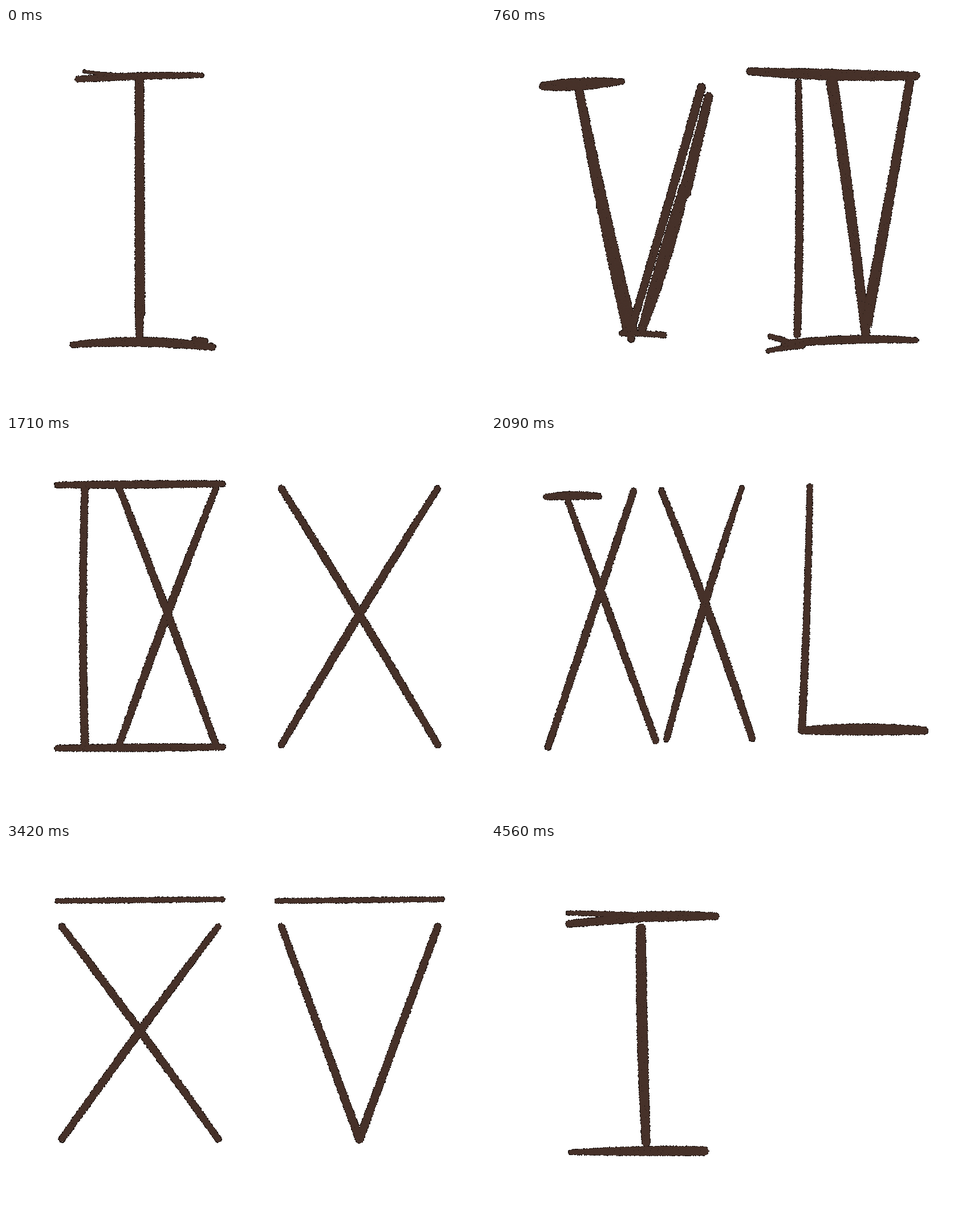
Animation of 840 by 667 pixels, one loop 4750 ms. Source, as an HTML page with a canvas:

```html
<!DOCTYPE html>
<html lang="en">
<head>
<meta charset="utf-8">
<title>Roman numerals</title>
<style>
html, body { margin: 0; width: 100%; height: 100%; overflow: hidden; background: #fff; }
canvas { display: block; }
</style>
</head>
<body>
<canvas id="stage" width="840" height="667"></canvas>
<script>
const STEP = 190, STEPS = 25;
const INK = '#47322a', EDGE = '#1d1411';
const ctx = document.getElementById('stage').getContext('2d');

let seed = 1;
const rand = () => (seed = (seed * 16807) % 2147483647) / 2147483647;
const jitter = a => (rand() * 2 - 1) * a;
const mix = (a, b, t) => a + (b - a) * t;

// A stroke is a list of samples {x, y, w, nx, ny}; the normal points to the side of a positive bow.
function sample(count, at) {
  return Array.from({ length: count + 1 }, (_, i) => {
    const t = i / count, p = at(t), a = at(Math.max(0, t - 0.01)), b = at(Math.min(1, t + 0.01));
    const d = Math.hypot(b.x - a.x, b.y - a.y) || 1;
    return { ...p, nx: (b.y - a.y) / d, ny: (a.x - b.x) / d };
  });
}

// One pull of the brush: tapered from w0 to w1, bowed sideways, fuller in the middle by belly.
function line(x0, y0, x1, y1, w0 = 12, w1 = w0, bow = 0, belly = 0) {
  const length = Math.hypot(x1 - x0, y1 - y0);
  const nx = (y1 - y0) / length, ny = (x0 - x1) / length;
  return sample(Math.ceil(length / 1.5), t => {
    const arch = 4 * t * (1 - t);
    return {
      x: mix(x0, x1, t) + nx * bow * arch,
      y: mix(y0, y1, t) + ny * bow * arch,
      w: mix(w0, w1, t) + belly * arch
    };
  });
}

// A smooth round stroke through a few points.
function curve(w, ...coords) {
  const pts = [];
  for (let i = 0; i < coords.length; i += 2) pts.push([coords[i], coords[i + 1]]);
  const last = pts.length - 1;
  const dist = (p, q) => Math.hypot(q[0] - p[0], q[1] - p[1]) || 1;
  const slope = (i, axis) => {
    const p = pts[Math.max(0, i - 1)], q = pts[Math.min(last, i + 1)];
    return (q[axis] - p[axis]) / dist(p, q);
  };
  const length = pts.slice(1).reduce((sum, p, i) => sum + dist(pts[i], p), 0);
  return sample(Math.ceil(length / 1.5), t => {
    const i = Math.min(last - 1, Math.floor(t * last)), f = t * last - i;
    const size = dist(pts[i], pts[i + 1]), ease = f * f * (3 - 2 * f);
    const coord = axis => mix(pts[i][axis], pts[i + 1][axis], ease) +
      size * (slope(i, axis) * f * (1 - f) ** 2 - slope(i + 1, axis) * f * f * (1 - f));
    return { x: coord(0), y: coord(1), w };
  });
}

// Letters set in a cell from l to r and from t to b.
const letters = {
  I: (l, r, t, b) => [line((l + r) / 2, t, (l + r) / 2, b, 12, 13, jitter(4))],
  V: (l, r, t, b) => [line(l, t, (l + r) / 2, b, 11, 14), line(r, t, (l + r) / 2, b, 12, 14)],
  X: (l, r, t, b) => [line(l, t, r, b, 11, 11, 2, 2), line(r, t, l, b, 10, 11, -2, 3)],
  L: (l, r, t, b) => [line(l + 12, t, l, b, 10, 13, 2), line(l, b, r, b, 12, 12, 1, 6)],
  C: (l, r, t, b) => {
    const x = u => mix(l, r, u), y = v => mix(t, b, v);
    return [curve(12, x(1), y(0.22), x(0.95), y(0.08), x(0.6), t, x(0.18), y(0.2), l, y(0.55),
      x(0.12), y(0.84), x(0.55), b, x(0.8), y(0.96), x(1), y(0.8))];
  },
  D: (l, r, t, b) => {
    const x = u => mix(l, r, u), y = v => mix(t, b, v);
    return [line(l, t, l, b, 13, 13, -8),
      curve(12, l, t, x(0.65), y(0.13), r, y(0.42), x(0.8), y(0.75), l, b)];
  },
  M: (l, r, t, b) => {
    const m = (l + r) / 2, dip = mix(t, b, 0.5), inset = (r - l) * 0.06;
    return [line(l, b, l + inset, t, 12, 11), line(l + inset, t, m, dip, 12),
      line(m, dip, r - inset, t, 13, 10), line(r - inset, t, r, b, 11, 12)];
  }
};

// Spreads letters over one half of the sheet; a leading "_" asks for an overline.
function plain(text, left) {
  const over = text[0] === '_', word = text.replace('_', '');
  const right = left + 290, top = over ? 145 : 92, bottom = over ? 518 : 542;
  const units = c => (c === 'I' ? 1 : 2);
  const cell = 290 / [...word].reduce((sum, c) => sum + units(c), 0);
  const strokes = [];
  let x = left;
  for (const c of word) {
    const end = x + units(c) * cell, pad = word.length > 1 ? 12 : 8;
    strokes.push(...letters[c](x + pad, end - pad, top, bottom));
    x = end;
  }
  if (over) strokes.push(line(left, 100, right, 97, 8, 8, 0, 1));
  if (word.includes('I')) {
    strokes.push(line(left, top - 6, right, top - 8, 10, 10, 0, 3));
    strokes.push(line(left, bottom + 6, right, bottom + 4, 10, 10, 0, 3));
  }
  return strokes;
}

// Numerals with a hand of their own.
const drawn = {
  I: () => [
    line(126, 90, 343, 83, 10, 8, 2, 3), line(137, 76, 230, 84, 5, 8, -2),
    line(234, 92, 235, 500, 15, 17), line(234, 500, 234, 540, 14, 12),
    line(117, 556, 362, 560, 10, 12, 7, 5), line(330, 546, 350, 549, 8)
  ],
  IV: () => [
    line(454, 76, 745, 84, 12, 13, -2, 6), line(539, 95, 537, 538, 10, 12, 3, 2),
    line(598, 95, 657, 535, 20, 15, 2), line(734, 95, 658, 520, 14, 19, 1),
    line(486, 567, 545, 557, 7, 11, 1), line(490, 541, 525, 552, 9), line(515, 554, 745, 548, 11, 9, 4, 4)
  ],
  V: () => [
    line(92, 102, 230, 94, 14, 9, 0, 9), line(155, 112, 244, 530, 14, 25, -2, 1),
    line(369, 104, 250, 515, 14, 12, 1, 1), line(382, 120, 340, 290, 14, 20),
    line(346, 254, 265, 528, 13, 14, 2, 9),
    line(229, 536, 303, 539, 9, 10, 1), line(240, 525, 246, 546, 12)
  ],
  VII: () => [
    line(93, 96, 369, 100, 9, 9, 0, 2), line(124, 112, 179, 528, 10, 14, 5),
    line(240, 106, 182, 528, 12, 12, -5), line(271, 102, 265, 517, 12, 13),
    line(335, 102, 334, 522, 11, 12), line(143, 534, 369, 529, 10, 9, 0, 2)
  ],
  VIII: () => [
    line(450, 89, 765, 91, 9, 10, -1, 3), line(502, 98, 523, 530, 12, 14, -12),
    line(600, 100, 530, 535, 12, 12, -3), line(616, 100, 601, 527, 12, 14, -8),
    line(672, 100, 656, 525, 12, 14, -8), line(735, 98, 726, 525, 10, 13, -9),
    line(494, 544, 755, 531, 10, 10, 2, 2)
  ],
  XX: () => [
    line(97, 107, 189, 106, 10, 10, 2, 4),
    line(135, 114, 289, 535, 10, 11, 0, 2), line(250, 97, 100, 546, 11, 11, 0, 2),
    line(299, 96, 458, 531, 10, 11, 4, 3), line(440, 91, 308, 532, 8, 10, -4, 4)
  ],
  L: () => [line(559, 89, 545, 516, 10, 13, 2), line(545, 517, 760, 517, 12, 13, 2, 7)],
  D: () => [
    line(198, 120, 198, 516, 13, 13, -10),
    curve(12, 198, 117, 250, 126, 345, 190, 369, 265, 332, 415, 285, 480, 205, 516),
    line(170, 523, 232, 523, 11)
  ],
  CM: () => [
    line(561, 191, 563, 128, 11),
    curve(11, 563, 128, 536, 107, 475, 205, 436, 370, 452, 455, 500, 509, 569, 462),
    line(597, 500, 610, 128, 12, 11, 3), line(610, 130, 661, 306, 12),
    line(661, 306, 719, 128, 13, 10), line(720, 128, 719, 504, 10, 12, -8),
    line(562, 503, 607, 502, 10), line(713, 504, 736, 499, 10, 7)
  ],
  _C: () => [
    line(139, 103, 328, 105, 8),
    curve(12, 334, 215, 325, 175, 262, 147, 190, 205, 158, 350, 175, 455, 270, 511, 300, 500, 337, 440),
    line(331, 153, 334, 240, 9, 13)
  ],
  _D: () => [
    line(506, 92, 700, 86, 9, 8, 1), line(555, 124, 550, 495, 14, 14, -11, 6),
    curve(11, 558, 121, 655, 175, 715, 222, 759, 325, 742, 380, 690, 426, 550, 493),
    line(540, 495, 557, 497, 11)
  ],
  wideI: () => [
    line(135, 121, 260, 127, 7, 12, 1), line(137, 140, 260, 129, 12, 16), line(260, 128, 394, 127, 17, 12, 1, 2),
    line(263, 148, 272, 524, 16, 14, -2, 3), line(140, 541, 374, 539, 8, 15, 1, 4)
  ]
};

const order = 'I II III IV V VI VII VIII IX X XX L C CD D CM M _V _X _L _C _D _M'.split(' ');

function numeral(i) {
  const name = order[i];
  return drawn[name] ? drawn[name]() : plain(name, i % 2 ? 475 : 90);
}

// Each numeral stays for two steps while the next takes the other half.
function strokesAt(step) {
  if (step === STEPS - 1) return drawn.wideI();
  const i = Math.min(step, order.length - 1);
  return i ? [...numeral(i - 1), ...numeral(i)] : numeral(0);
}

function speck(x, y, size) {
  ctx.fillRect(Math.round(x - size / 2), Math.round(y - size / 2), size, size);
}

function roughEdge(stroke) {
  ctx.fillStyle = EDGE;
  for (const { x, y, w, nx, ny } of stroke) {
    for (const side of [-1, 1]) {
      const r = side * (w / 2 - 0.4 + jitter(0.9));
      speck(x + nx * r, y + ny * r, 2);
    }
  }
  for (const { x, y, w } of [stroke[0], stroke[stroke.length - 1]]) {
    for (let a = 0; a < Math.PI * 2; a += 0.26) {
      const r = w / 2 - 0.4 + jitter(0.9);
      speck(x + Math.cos(a) * r, y + Math.sin(a) * r, 2);
    }
  }
}

function fillStroke(stroke) {
  ctx.fillStyle = INK;
  for (const { x, y, w } of stroke) {
    ctx.beginPath();
    ctx.arc(x, y, w / 2 - 0.3 + jitter(0.4), 0, Math.PI * 2);
    ctx.fill();
  }
}

function grain(stroke) {
  ctx.fillStyle = EDGE;
  for (const { x, y, w } of stroke) {
    if (rand() < 0.12) speck(x + jitter(w * 0.4), y + jitter(w * 0.4), 1);
  }
}

function draw(step) {
  seed = 1234 + step * 977;
  ctx.fillStyle = '#fff';
  ctx.fillRect(0, 0, 840, 667);
  const strokes = strokesAt(step);
  for (const pass of [roughEdge, fillStroke, grain]) strokes.forEach(pass);
}

let shown = -1;
const start = performance.now();
function tick() {
  const step = Math.floor((performance.now() - start) / STEP) % STEPS;
  if (step !== shown) draw(shown = step);
  requestAnimationFrame(tick);
}
tick();
</script>
</body>
</html>
```
